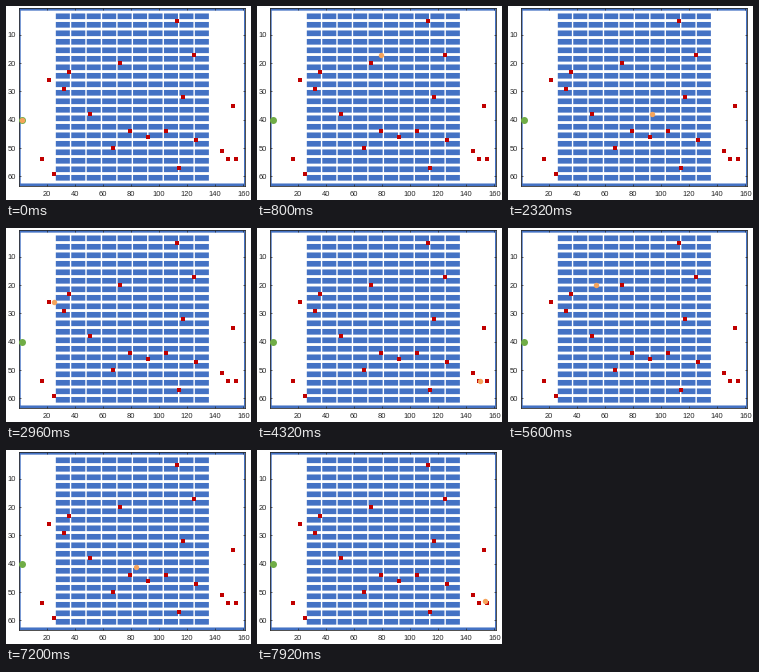
Write a matplotlib script that moves like this. It is 245 px wide and 194 px high and loops after 8 s.

```python
import numpy as np
import matplotlib.pyplot as plt
from matplotlib.animation import FuncAnimation
from matplotlib.patches import Rectangle

W, H, DPI = 245, 194, 100
PX = 72 / DPI  # points per pixel
FRAMES, INTERVAL = 100, 80
CELLS_PER_FRAME = 10
COLS, ROWS = 161, 63
FIRST_AISLE, AISLE_STEP = 26, 11

BLUE, RED, GREEN, ORANGE = "#4472c4", "#c00000", "#70ad47", "#f6a45c"
INK = "#262626"

HOME, DOCK, BAY = (2.5, 40), (155, 54), (22, 26)
NORTH, EAST, WEST, SOUTH, INNER = (113, 5), (125, 17), (17, 54), (114, 57), (32, 29)

# One pick in every third row of the middle, the rest scattered around it.
middle = zip([EAST[0], 72, 36, BAY[0], INNER[0], 117, 153, 51], range(17, 39, 3))
PICKS = [NORTH, *middle, (79, 44), (105, 44), (92, 46), (126, 47), (67, 50),
         (145, 51), WEST, (149, 54), DOCK, SOUTH, (25, 59)]

# The robot's stops; the aisles between them follow from route().
TURN = (114, 53)
STOPS = [HOME, (26, 38), EAST, (155, 17), DOCK, (148, 53), (53, 38), BAY,
         (71, 44), (137, 53), DOCK, (143, 50), NORTH, (87, 14), (53, 20), BAY,
         WEST, INNER, (23, 28), BAY, (64, 41), TURN, SOUTH, TURN, (154, 53)]


def route(stops):
    """Join the stops, changing rows in the cross aisle nearest to halfway."""
    points = [stops[0]]
    for (x0, y0), (x1, y1) in zip(stops, stops[1:]):
        aisle = round(((x0 + x1) / 2 - FIRST_AISLE) / AISLE_STEP)
        x = np.clip(FIRST_AISLE + AISLE_STEP * aisle, min(x0, x1), max(x0, x1))
        points += [(x, y0), (x, y1), (x1, y1)]
    return np.array(points, float)


PATH = route(STOPS)
TRAVEL = np.append(0, np.abs(np.diff(PATH, axis=0)).sum(axis=1).cumsum())


def robot_at(frame):
    distance = frame * CELLS_PER_FRAME
    return [np.interp(distance, TRAVEL, PATH[:, k]) for k in (0, 1)]


def block(col, row, width, height):
    """Fill a block of cells whose top left cell is (col, row)."""
    ax.add_patch(Rectangle((col - 0.5, row - 0.5), width, height,
                           fc=BLUE, lw=0, snap=False, zorder=1))


plt.rcParams["font.family"] = "Liberation Sans"
fig = plt.figure(figsize=(W / DPI, H / DPI), dpi=DPI, facecolor="white")
left, right, top, bottom = 13.3, 239.4, 1.8, 180.3
ax = fig.add_axes([left / W, 1 - bottom / H,
                   (right - left) / W, (bottom - top) / H])
ax.set_xlim(0.5, COLS + 0.5)
ax.set_ylim(ROWS + 0.5, 0.5)
ax.set_axisbelow(False)
ax.set_xticks(range(20, 161, 20))
ax.set_yticks(range(10, 61, 10))
ax.tick_params(direction="in", length=2 * PX, width=0.7 * PX, pad=3 * PX,
               top=True, right=True, color=INK, labelcolor=INK,
               labelsize=7.5 * PX)
ax.tick_params(axis="x", pad=5 * PX)
for spine in ax.spines.values():
    spine.set(color=INK, linewidth=0.8 * PX)

# Outer walls and shelves
for row in (1, ROWS):
    block(1, row, COLS, 1)
for col in (1, COLS):
    block(col, 1, 1, ROWS)
for i in range(10):
    for j in range(20):
        block(FIRST_AISLE + 1 + AISLE_STEP * i, 3 + 3 * j, AISLE_STEP - 1, 2)

marker = dict(ls="none", mew=0, snap=False, clip_on=False)
ax.plot(*HOME, "o", ms=7 * PX, color=GREEN, zorder=4, **marker)
ax.plot(*zip(*PICKS), "s", ms=4.2 * PX, color=RED, zorder=4, **marker)
robot, = ax.plot([], [], "o", ms=5.4 * PX, color=ORANGE, zorder=5, **marker)


def update(frame):
    x, y = robot_at(frame)
    robot.set_data([x], [y])
    return robot,


anim = FuncAnimation(fig, update, frames=FRAMES, interval=INTERVAL,
                     repeat=True, repeat_delay=0, blit=False)
plt.show()
```
